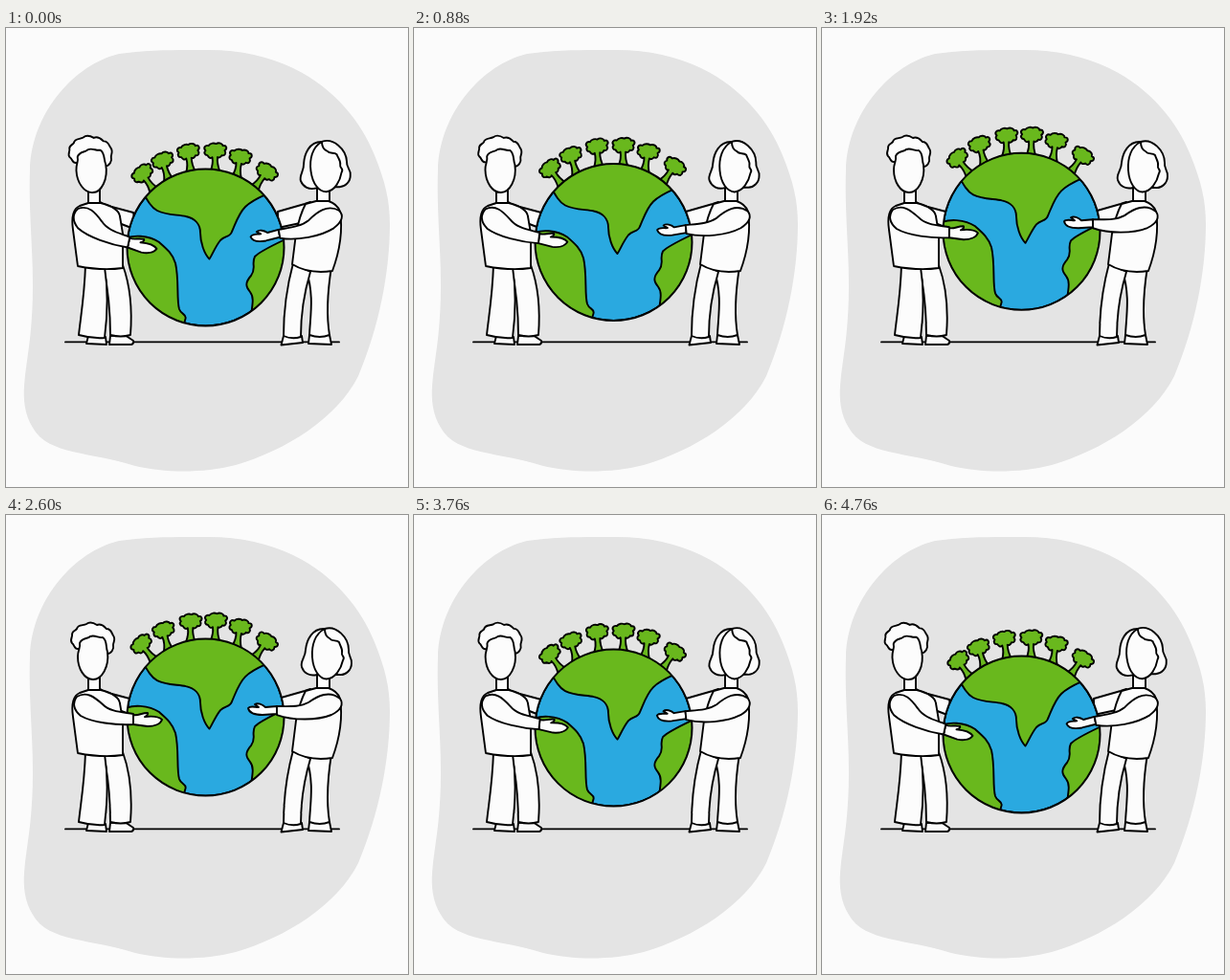
An HTML page for the animation above (4.96 s loop, 420 by 480 pixels).

```html
<!DOCTYPE html>
<html lang="en">
<head>
<meta charset="utf-8">
<title>Lifting the Earth</title>
<style>
  html, body { margin: 0; width: 100%; height: 100%; overflow: hidden; background: #fbfbfb; }
  svg { display: block; width: 420px; height: 480px; }
  .ink { fill: #fcfcfc; stroke: #000; stroke-width: 1.9; stroke-linecap: round; stroke-linejoin: round; }
  .land { fill: #69b81d; }
  .sea { fill: #2aa9e0; }
  .rim { fill: none; stroke-width: 2; }
</style>
</head>
<body>
<svg viewBox="0 0 420 480">
  <defs>
    <clipPath id="disc"><circle cx="208.5" cy="229.5" r="82"/></clipPath>
    <path id="tree" class="land" d="M-5 2C-3-3-2-8-3-13C-5-11-7-13-8-15C-11-15-12-18-10-20C-13-23-10-26-7-25C-5-28-1-28 1-27C4-29 8-27 8-25C12-26 13-22 10-20C12-17 10-14 7-15C6-13 4-12 2.500-13C2-8 3-3 5 2Z"/>
  </defs>

  <path fill="#e4e4e4" d="M118 27C150 22 190 23 212 23C245 23 275 30 300 42C345 64 372 100 385 133C396 160 401 180 401 205C401 255 390 312 368 364C346 408 292 442 240 457C205 466 165 465 135 458C90 443 44 447 28 418C11 390 22 360 26 315C32 255 23 205 25 148C27 88 72 38 118 27Z"/>

  <g class="ink">
    <path d="M62 328.400H348"/>

    <!-- far arms -->
    <path d="M97 181L103 185L133 193L136 211L118 204Z"/>
    <path d="M318 182L312 184L284 192L284 209L312 203Z"/>

    <g id="globe">
      <g id="trees"></g>
      <g clip-path="url(#disc)">
        <circle class="sea" cx="208.5" cy="229.5" r="82"/>
        <path class="land" d="M142 170C148 181 152 188 158 191C168 196 180 195 188 197C197 199 203 205 203 214C203 224 207 236 212.500 241.500C215 238 219 228 224 222C229 217 234 219 236 213C240 204 243 194 250 187C257 180 265 177 276 172V130H140Z"/>
        <path class="land" d="M120 222C132 215 150 217 160 224C168 231 174 236 177 246C181 263 178 284 181 294C183 300 189 299 187.500 304L183 320H110Z"/>
        <path class="land" d="M300 217C284 225 267 232 260 239C256 247 262 251 256 259C249 267 251 271 255 276C259 281 258 287 256 300H300Z"/>
      </g>
      <circle class="rim" cx="208.5" cy="229.5" r="82"/>
    </g>

    <!-- left figure -->
    <path d="M86 322L84 330L105 331L104 323Z"/>
    <path d="M109 322L108 331H131Q134 330 133 327L124 321Z"/>
    <path d="M102 250C107 275 109 295 109 321Q120 324 130 321C132 295 130 270 122 248Z"/>
    <path d="M83 248C82 280 78 302 76 321Q90 325 103 324C106 300 107 275 103 250Z"/>
    <path d="M77 186C70 189 68 197 70 211L75 249C90 252 108 253 122 251L122 215L119 197Q118 188 99 183H86Z"/>
    <path d="M86 168V183H98V168Z"/>
    <g id="headL">
      <path d="M76 140C71 141 72 136 69 134C66 131 70 127 69 125C69 121 73 121 74 119C75 114 81 116 84 114C88 111 92 113 95 115C100 113 103 117 105 119C110 119 110 123 112 126C115 130 112 133 112 136C113 140 110 145 106 145Z"/>
      <path d="M75 148C75 141 78 139 77 134C79 128 85 130 88 127C93 125 97 129 101 128C106 131 104 138 106 143C108 159 100 172 91 172C82 172 75 161 75 148Z"/>
    </g>
    <g id="armL">
      <path d="M133 209C139 210 141 207 148 207C149 209 147 210 145 211C153 210 160 211 163 214C161 219 154 221 148 221L133 219Z"/>
      <path d="M74 190C84 184 92 190 101 198C109 206 121 206 133 208V219C115 220 90 217 78 210C71 204 69 197 74 190Z"/>
    </g>

    <!-- right figure -->
    <path d="M290 322L287.500 331.500L310 329L309 322Z"/>
    <path d="M317 321L316 330L340 331L338 321Z"/>
    <path d="M314 254C322 280 318 300 317 321Q328 325 338 321C334 297 336 275 340 250Z"/>
    <path d="M300 246C293 272 290 295 290 322Q299 326 308 323C308 295 312 275 318 255Z"/>
    <path d="M324 181L313 184Q307 195 303 215L299 247C312 255 328 256 341 254C348 235 352 212 349 192Q346 184 337 181Z"/>
    <path d="M325 166V181H338V166Z"/>
    <g id="headR">
      <path d="M333 119C320 118 314 131 313 141C313 149 307 153 309 159C311 165 317 169 325 167H348C355 168 361 162 361 155C362 150 357 147 358 141C358 128 345 115 333 119Z"/>
      <path d="M333 119C323 124 319 136 320 149C321 162 327 171 335 171.500C344 171 350 161 352 152C355 148 350 148 351 144C352 140 349 137 348 133C345 130 341 133 338 129C334 127 333 123 333 119Z"/>
    </g>
    <g id="armR">
      <path d="M283 200L271 201C268 198 263 196 260 198L264 201C260 201 255 199 253 202C254 207 261 209 268 209L283 208Z"/>
      <path d="M349 192C338 183 326 189 316 196C307 201 295 200 283 200V209C300 215 325 215 340 209C350 204 353 198 349 192Z"/>
    </g>
  </g>
</svg>
<script>
const LOOP = 4960, MOVE = 4760, STEP = 40, HOLD = 200, LIFT = 18.3;
const $ = id => document.getElementById(id);
const parts = Object.fromEntries(
  ["globe", "trees", "headL", "headR", "armL", "armR"].map(id => [id, $(id)]));

// [angle on the globe, tilt when lifted, sway]
const trees = [
  [-42, -38, -4], [-28.5, -14, 3], [-11, 0, 7], [7, 2, 2], [23.5, 10, 0], [39.5, 36, 0],
].map(([angle, tilt, sway]) => {
  const el = document.createElementNS("http://www.w3.org/2000/svg", "use");
  el.setAttribute("href", "#tree");
  parts.trees.append(el);
  return { el, angle, tilt, sway };
});

const place = (el, transform) => el.setAttribute("transform", transform);
const turn = (id, deg, x, y) => place(parts[id], `rotate(${deg} ${x} ${y})`);

function draw(now) {
  const t = Math.floor(now % LOOP / STEP) * STEP;
  const resting = t < HOLD || t >= MOVE;
  const lift = resting ? 0 : (1 - Math.cos(2 * Math.PI * t / MOVE)) / 2;
  const down = 1 - lift;
  const lean = -3 * down ** 3;
  const reach = down ** 1.6;

  place(parts.globe, `translate(0 ${-LIFT * lift})`);
  for (const { el, angle, tilt, sway } of trees)
    place(el, `translate(208.5 229.5) rotate(${angle}) translate(0 -82) rotate(${tilt - angle - sway * down})`);
  turn("headL", lean, 92, 178);
  turn("headR", lean, 331, 178);
  turn("armL", 12 * reach, 80, 196);
  turn("armR", -10.5 * reach, 343, 196);
}

function tick() {
  draw(performance.now());
  requestAnimationFrame(tick);
}
tick();
</script>
</body>
</html>
```
